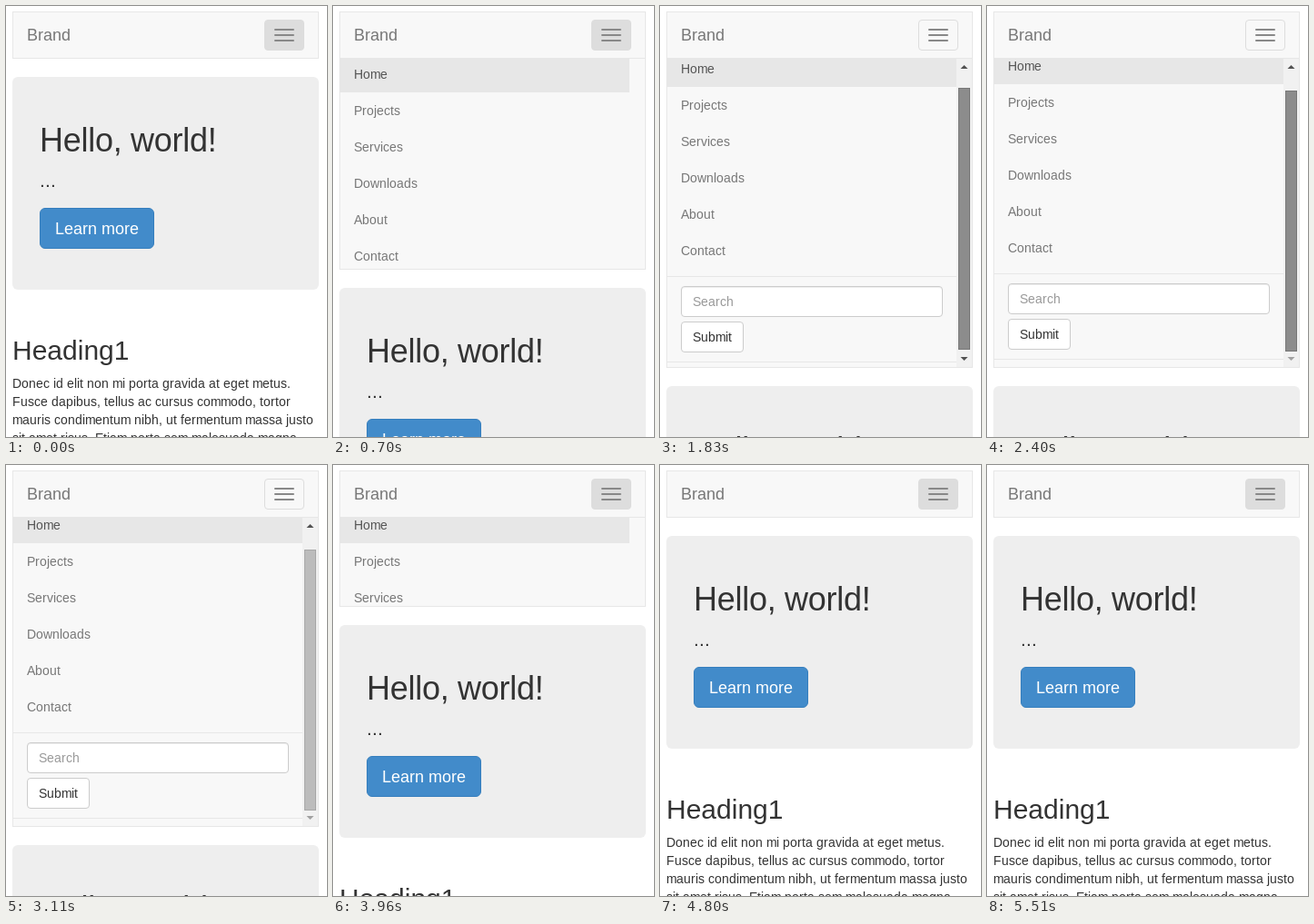
These frames come from a looping animation (353 px wide and 474 px high, 5.54 s). An HTML page:

```html
<!DOCTYPE html>
<html lang="en">
<head>
<meta charset="utf-8">
<title>Collapsing navbar</title>
<style>
* { box-sizing: border-box; }
html, body { margin: 0; width: 100%; height: 100%; overflow: hidden; background: #fff; }
body { font: 14px/20px "Liberation Sans", Arial, sans-serif; font-kerning: none; color: #333; }
#stage { position: relative; width: 353px; height: 474px; overflow: hidden; }
#stage div, #stage svg { position: absolute; white-space: nowrap; }

#nav { left: 7px; top: 6px; width: 337px; background: #f8f8f8; border: 1px solid #e7e7e7; }
#brand { left: 15px; top: 15px; font-size: 18px; color: #777; }
#toggle { left: 276px; top: 8px; width: 44px; height: 34px; border: 1px solid #ddd; border-radius: 4px; }
#toggle.on { background: #ddd; }
#toggle div { left: 10px; width: 22px; height: 2px; border-radius: 1px; background: #888; }

#menu { left: 0; top: 50px; width: 335px; border-top: 1px solid #e7e7e7; overflow: hidden; }
#list { left: 0; top: -3px; width: 318px; height: 400px; }
.link { left: 0; width: 318px; height: 40px; padding: 10px 15px; color: #777; }
.link.active { background: #e7e7e7; color: #555; }
.rule { left: 0; width: 318px; height: 1px; background: #e7e7e7; }
.field { left: 15px; height: 34px; padding: 6px 12px; border: 1px solid #ccc; border-radius: 4px; background: #fff; }
#search { top: 259px; width: 288px; color: #999; box-shadow: inset 0 1px 1px rgba(0,0,0,.075); }
#submit { top: 298px; }

#bar { left: 318px; top: 0; width: 17px; height: 339px; background: #f1f1f1; }
#thumb { left: 2px; width: 13px; background: #bcbcbc; border: 1px solid #a8a8a8; }
#thumb.held { background: #8c8c8c; border-color: #787878; }
#bar svg { left: 0; top: 0; }

#page { left: 0; top: 78px; width: 353px; height: 460px; }
#hero { left: 7px; top: 0; width: 337px; height: 234px; border-radius: 6px; background: #eee; }
#hello { left: 30px; top: 50px; font-size: 36px; line-height: 40px; letter-spacing: -.28px; }
#dots { left: 30px; top: 99px; font-size: 21px; line-height: 30px; }
#learn { left: 30px; top: 144px; height: 45px; padding: 0 16px; font-size: 18px; line-height: 45px;
  color: #fff; background: #428bca; border: 1px solid #357ebd; border-radius: 6px; }
#heading { left: 7px; top: 284px; font-size: 30px; line-height: 33px; }
#text { left: 7px; top: 327px; }
</style>
</head>
<body>
<div id="stage">
  <div id="page">
    <div id="hero">
      <div id="hello">Hello, world!</div>
      <div id="dots">...</div>
      <div id="learn">Learn more</div>
    </div>
    <div id="heading">Heading1</div>
    <div id="text">Donec id elit non mi porta gravida at eget metus.<br>Fusce dapibus, tellus ac cursus commodo, tortor<br>mauris condimentum nibh, ut fermentum massa justo<br>sit amet risus. Etiam porta sem malesuada magna</div>
  </div>
  <div id="nav">
    <div id="brand">Brand</div>
    <div id="toggle"><div style="top:9px"></div><div style="top:15px"></div><div style="top:21px"></div></div>
    <div id="menu">
      <div id="list">
        <div class="rule" style="top:248px"></div>
        <div class="field" id="search">Search</div>
        <div class="field" id="submit">Submit</div>
        <div class="rule" style="top:342px"></div>
      </div>
      <div id="bar">
        <div id="thumb"></div>
        <svg width="17" height="339">
          <path d="M4.5 11h8l-4-4z" fill="#505050"/>
          <path id="down" d="M4.5 328h8l-4 4z"/>
        </svg>
      </div>
    </div>
  </div>
</div>
<script>
const LOOP = 5540, OPEN = 340, SCROLL = 9;
const $ = id => document.getElementById(id);

["Home", "Projects", "Services", "Downloads", "About", "Contact"].forEach((name, i) => {
  const link = document.createElement("div");
  link.className = i ? "link" : "link active";
  link.textContent = name;
  link.style.top = i * 40 + "px";
  $("list").append(link);
});

// Small text sits on whole pixels: round each letter's advance, wide letters down.
function snap(el) {
  for (const node of [...el.childNodes].filter(n => n.nodeType === Node.TEXT_NODE)) {
    const letters = [...node.data].map(ch => {
      const span = document.createElement("span");
      span.textContent = ch;
      return span;
    });
    node.replaceWith(...letters);
    const widths = letters.map(span => span.getBoundingClientRect().width);
    letters.forEach((span, i) => {
      const w = widths[i];
      span.style.letterSpacing = (w > 10 ? Math.floor(w) : Math.round(w)) - w + "px";
    });
  }
}
document.querySelectorAll("#brand, #dots, #learn, #text, .link, .field").forEach(snap);

// start ms, menu height, scroll, toggle lit, thumb held
const steps = [
  [0, 0, 0, 1, 0],
  [700, 232, 0, 1, 0],
  [840, OPEN, 0, 1, 0],
  [1550, OPEN, 0, 0, 1],
  [1690, OPEN, 3, 0, 1],
  [1830, OPEN, 6, 0, 1],
  [1980, OPEN, SCROLL, 0, 1],
  [2690, OPEN, SCROLL, 0, 0],
  [3530, OPEN, SCROLL, 1, 0],
  [3960, 98, SCROLL, 1, 0],
  [4100, 12, SCROLL, 1, 0],
  [4240, 0, 0, 1, 0]
];

function draw(time) {
  const [, height, scroll, lit, held] = steps.findLast(s => s[0] <= time);
  const k = scroll / SCROLL;
  $("nav").style.height = 52 + height + "px";
  $("menu").style.height = height + "px";
  $("menu").style.display = height ? "block" : "none";
  $("page").style.top = 78 + height + "px";
  $("list").style.top = -3 - scroll + "px";
  $("toggle").className = lit ? "on" : "";
  $("bar").style.display = height === OPEN ? "block" : "none";
  $("thumb").className = held ? "held" : "";
  $("thumb").style.top = 26 + scroll + "px";
  $("thumb").style.height = Math.round(289 - 2 * k) + "px";
  $("down").style.fill = k === 1 ? "#a0a0a0" : "#505050";
}

const start = performance.now();
function tick() {
  draw((performance.now() - start) % LOOP);
  requestAnimationFrame(tick);
}
tick();
</script>
</body>
</html>
```
